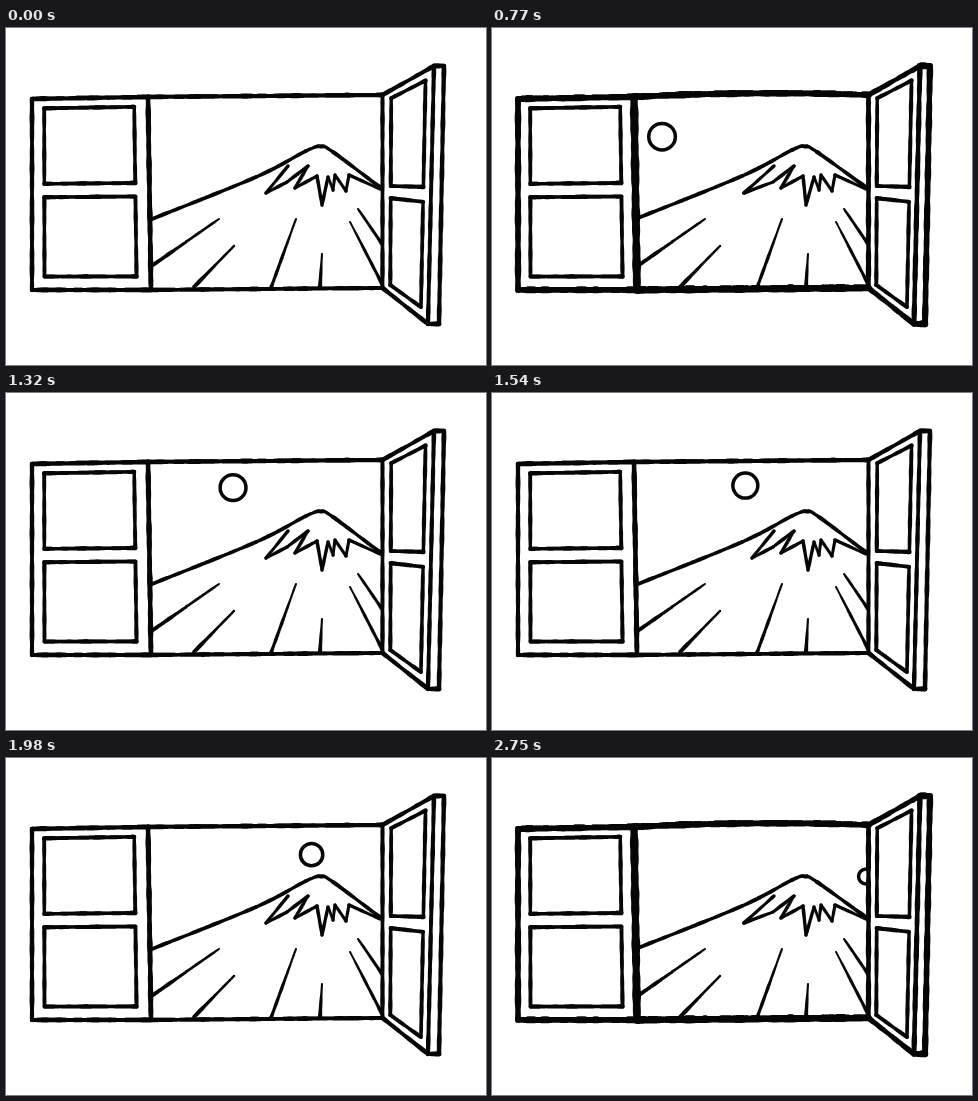
Animation of 480 by 337 pixels, one loop 2.86 s. Source, as an HTML page with a canvas:

```html
<!DOCTYPE html>
<html>
<head>
<meta charset="utf-8">
<style>
html, body { margin: 0; width: 100%; height: 100%; overflow: hidden; background: #fff; }
canvas { display: block; }
</style>
</head>
<body>
<canvas id="stage" width="480" height="337"></canvas>
<script>
const W = 480, H = 337, STEP = 110, STEPS = 26;
const ctx = document.getElementById('stage').getContext('2d');
const mix = (a, b, t) => a + (b - a) * t;
const clamp = (v, lo, hi) => Math.max(lo, Math.min(hi, v));

// Catmull-Rom interpolation along one axis
function spline(a, b, c, d, t) {
  return 0.5 * (2 * b + (c - a) * t + (2 * a - 5 * b + 4 * c - d) * t * t +
    (3 * b - a - 3 * c + d) * t * t * t);
}

// Brush stroke along at(t), t from 0 to 1, whose width wobbles from w0 to w1
function brush(g, at, length, w0, w1 = w0) {
  const count = Math.ceil(length * 2);
  const phase = length * 1.7;
  g.beginPath();
  for (let i = 0; i <= count; i++) {
    const t = i / count, run = phase + i / 2;
    const [x, y] = at(t);
    const wobble = 1 + 0.07 * Math.sin(run * 0.13) + 0.05 * Math.sin(run * 0.37);
    const r = mix(w0, w1, t) / 2 * wobble;
    g.moveTo(x + r, y);
    g.arc(x, y, r, 0, 7);
  }
  g.fill();
}

// Line between two points, bent downwards by bow pixels at its middle
function line(g, [x0, y0], [x1, y1], w0, w1 = w0, bow = 0) {
  const at = t => [mix(x0, x1, t), mix(y0, y1, t) + 4 * bow * t * (1 - t)];
  brush(g, at, Math.hypot(x1 - x0, y1 - y0), w0, w1);
}

function chain(g, pts, w) {
  pts.slice(1).forEach((p, i) => line(g, pts[i], p, w));
}

function curve(g, pts, w) {
  const last = pts.length - 1;
  for (let i = 0; i < last; i++) {
    const near = [i - 1, i, i + 1, i + 2].map(k => pts[clamp(k, 0, last)]);
    const at = t => [0, 1].map(k => spline(...near.map(p => p[k]), t));
    const [, b, c] = near;
    brush(g, at, Math.hypot(c[0] - b[0], c[1] - b[1]), w);
  }
}

// Four-sided outline on a surface that maps (u, v) to the stage
function pane(g, surface, u0, v0, u1, v1, w) {
  const corners = [[u0, v0], [u1, v0], [u1, v1], [u0, v1], [u0, v0]];
  chain(g, corners.map(([u, v]) => surface(u, v)), w);
}

const leftDoor = (u, v) => [mix(26, mix(142, 145, v), u), mix(mix(71, 69, u), 262, v)];
const rightDoor = (u, v) => [
  mix(376.5, mix(428, 422, v), u),
  mix(mix(67, 38, u), mix(260, 296, u), v)
];

function drawDoors(g, frame, post, detail) {
  const rows = [[0.05, 0.445], [0.515, 0.93]];
  pane(g, leftDoor, 0, 0, 1, 1, frame);
  line(g, leftDoor(1, 0), leftDoor(1, 1), post);
  for (const [top, bottom] of rows) pane(g, leftDoor, 0.105, top, 0.88, bottom, detail);

  pane(g, rightDoor, 0, 0, 1, 1, mix(frame, detail, 0.5));
  chain(g, [rightDoor(1, 0), [438, 38], [433, 296], rightDoor(1, 1)], frame);
  for (const [top, bottom] of [[0.04, 0.47], [0.53, 0.955]]) {
    pane(g, rightDoor, 0.17, top, 0.84, bottom, detail);
  }
}

function drawMountain(g, bold) {
  const peak = bold ? 313 : 315;
  const slope = [[146, 191 - bold], [250, 149 - bold], [300, 123 - bold],
    [peak, 118.5], [peak + 12, 124], [375, 160]];
  curve(g, slope, 3.8);

  const snow = [[282, 138], [bold ? 252 : 260, 165], [281, 154], [302, 138], [289, 160],
    [311, 148], [peak + 1, 177], [322, 149], [327, 162], [329, 147],
    [340, 163], [343, 147], [374, 161]];
  chain(g, snow, 3.4);

  const rays = [[147, 237, 213, 191], [188, 259, 228, 218], [265, 260, 290, 191],
    [314, 259, 316, 226], [376, 256, 344, 194], [376, 216, 352, 181]];
  for (const [x0, y0, x1, y1] of rays) line(g, [x0, y0], [x1, y1], 4, 2.2);
}

function makePose(bold) {
  const layer = document.createElement('canvas');
  layer.width = W;
  layer.height = H;
  const g = layer.getContext('2d');
  g.fillStyle = '#060606';
  g.filter = 'blur(0.4px)';
  drawDoors(g, bold ? 6 : 4.5, bold ? 8 : 5, 4);
  line(g, leftDoor(1, 0), rightDoor(0, 0), bold ? 6.5 : 4.5, bold ? 6 : 4.5, bold ? -2.5 : 0);
  line(g, leftDoor(1, 1), rightDoor(0, 1), bold ? 7 : 4.2);
  drawMountain(g, bold);
  return layer;
}

// The sun crosses the opening on a shallow arc and shrinks as it sets
function drawSun(step) {
  const u = step - 14.5, edge = 10.5;
  const c = clamp(u, -edge, edge);
  const ease = mix(c / edge, Math.sin(Math.PI / 2 * c / edge), 0.4);
  const x = 260 + 114 * ease + 8 * (u - c);
  const y = 92.5 + 0.002 * (x - 260) ** 2;
  const r = 13.3 - 0.0192 * (u + 7) ** 2;
  ctx.save();
  ctx.beginPath();
  ctx.rect(144, 71, 232, 190);
  ctx.clip();
  ctx.beginPath();
  ctx.arc(x, y, r, 0, Math.PI * 2);
  ctx.lineWidth = 3.5;
  ctx.strokeStyle = '#060606';
  ctx.stroke();
  ctx.restore();
}

const poses = [makePose(0), makePose(1)];
const start = performance.now();

function render(now) {
  const step = Math.floor(Math.max(0, now - start) / STEP) % STEPS;
  ctx.fillStyle = '#fff';
  ctx.fillRect(0, 0, W, H);
  drawSun(step);
  ctx.drawImage(poses[step % 2], 0, 0);
  requestAnimationFrame(render);
}
render(start);
</script>
</body>
</html>
```
